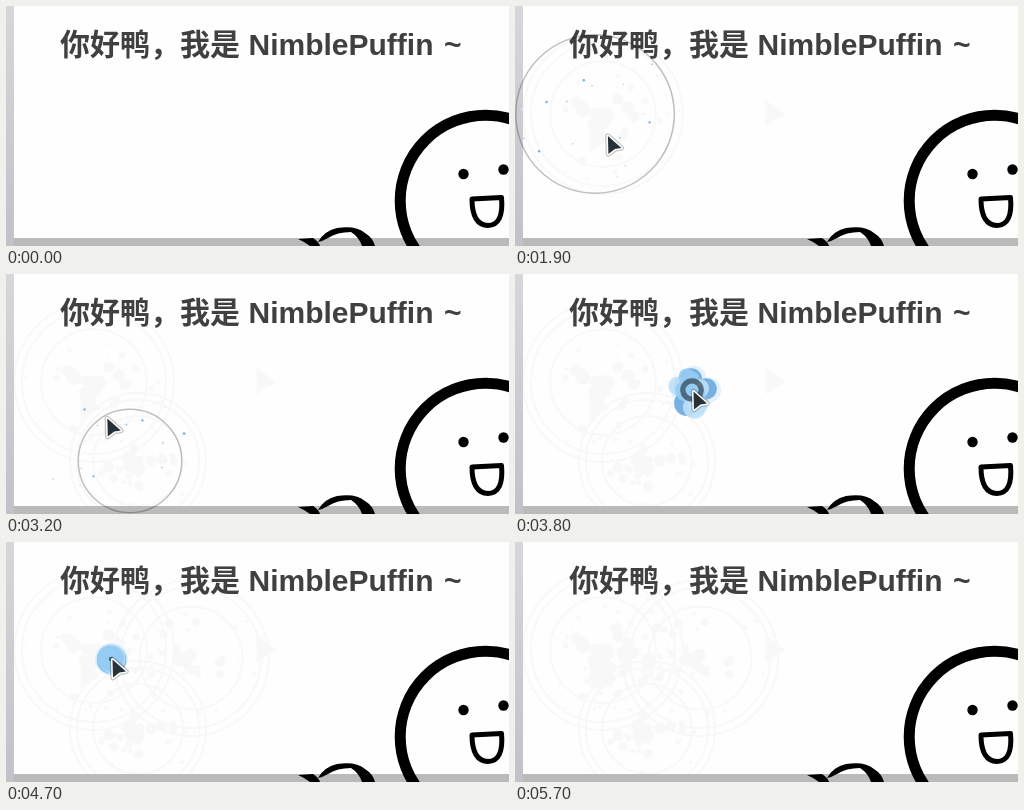
These frames come from a looping animation (503 by 240 pixels, 6000 ms). An HTML page:

```html
<!DOCTYPE html>
<html lang="zh-CN">
<head>
<meta charset="utf-8">
<title>Click fireworks</title>
<style>
html, body { margin: 0; width: 100%; height: 100%; overflow: hidden; background: #fff; }
svg { display: block; width: 503px; height: 240px; }
.title { font: bold 30px "Liberation Sans", "Noto Sans CJK SC", "Noto Sans CJK", sans-serif; fill: #404040; }
</style>
</head>
<body>
<svg viewBox="0 0 503 240" xmlns="http://www.w3.org/2000/svg">
  <defs>
    <linearGradient id="side" x2="0" y2="1">
      <stop offset="0" stop-color="#d8d6da"/>
      <stop offset="1" stop-color="#c2c1c8"/>
    </linearGradient>
    <clipPath id="panel"><rect x="8" width="495" height="232"/></clipPath>
    <path id="arrow" d="M1.500 2.500L15 14.500L8.500 15.500L2 20.500Z" stroke-linejoin="round"/>
  </defs>
  <rect width="503" height="240" fill="url(#side)"/>
  <rect x="8" y="232" width="495" height="8" fill="#bababb"/>
  <rect x="8" width="495" height="232" fill="#fefefe"/>
  <g id="stains" clip-path="url(#panel)" fill="#f8f8f8" stroke="#f8f8f8"></g>

  <g>
    <path d="M292 233L307 232Q313 236 314 240H304Q299 236 292 233Z"/>
    <path d="M312 236Q318 225 331 222Q350 219 359 227Q367 232 369 240H356Q353 231 345 226Q331 226 322 232Q317 235 312 236Z"/>
    <circle cx="479.700" cy="194.700" r="85.500" fill="none" stroke="#000" stroke-width="11"/>
    <circle cx="457.500" cy="168" r="5.200"/>
    <circle cx="497.500" cy="163.500" r="5.200"/>
    <path d="M466 193L495.500 191.500Q498 219 482 219.500Q466 219 466 193Z" fill="#fefefe" stroke="#000" stroke-width="5" stroke-linejoin="round"/>
  </g>

  <g class="title">
    <text x="54" y="49">你好鸭，我是</text>
    <text x="242.500" y="49">NimblePuffin</text>
    <text x="438" y="49">~</text>
  </g>
  <g id="fx"></g>
  <g id="cursor">
    <use href="#arrow" fill="none" stroke="#000" stroke-width="5.500" opacity=".22"/>
    <use href="#arrow" fill="#263238" stroke="#fff" stroke-width="3"/>
    <use href="#arrow" fill="#263238"/>
  </g>
</svg>
<script>
const LOOP = 6000, STEP = 100;
const el = id => document.getElementById(id);
// Paint order: later shades lie on top
const blues = ['#e0f0fc', '#6ca9df', '#bfe0f8', '#93ccf3'];

function rng(seed) {
  return () => (seed = (seed * 16807) % 2147483647) / 2147483647;
}

const dot = (x, y, r, attrs = '') =>
  `<circle cx="${x.toFixed(2)}" cy="${y.toFixed(2)}" r="${r.toFixed(2)}" ${attrs}/>`;

// Pointer: first place, then eased moves
const home = { x: 250, y: 95 };
const moves = [
  { from: 800, to: 1200, x: 76, y: 119 },
  { from: 1200, to: 1400, x: 80, y: 107 },
  { from: 1700, to: 2300, x: 124, y: 186 },
  { from: 2800, to: 3300, x: 97, y: 137 },
  { from: 3300, to: 3600, x: 177, y: 115 },
  { from: 3900, to: 4400, x: 105, y: 115 },
  { from: 4900, to: 5300, x: 475, y: 106 }
];

function pointer(t) {
  if (t < moves[0].from || t > moves.at(-1).to) return null;
  let { x, y } = home;
  for (const m of moves) {
    const k = Math.min(1, Math.max(0, (t - m.from) / (m.to - m.from)));
    const e = k * k * (3 - 2 * k);
    x += (m.x - x) * e;
    y += (m.y - y) * e;
  }
  return [x, y];
}

// ring: radius the circle tends to; speed: pace of the burst
const bursts = [
  { x: 80, y: 108, start: 1670, speed: 2.4, ring: 104 },
  { x: 124, y: 187, start: 2650, speed: 1, ring: 68 },
  { x: 177, y: 116, start: 3752, speed: 1, ring: 78 },
  { x: 105, y: 117, start: 4696, speed: 1, ring: 78 }
];
const COUNT = 16, LIFE = 0.75;

bursts.forEach((b, n) => {
  const rnd = rng(41 + n * 97);
  b.dots = Array.from({ length: COUNT }, (_, i) => {
    const shade = Math.floor(i * blues.length / COUNT);
    return { angle: i * 2.4 + rnd(), reach: 30 + rnd() * 58, size: 18 - shade * 1.5 - rnd() * 4, shade };
  });
});

function drawBurst(b, t) {
  const age = (t - b.start) / 1000 * b.speed;
  if (age < 0 || age > LIFE) return '';
  const rest = Math.exp(-4.6 * age), left = Math.exp(-2.6 * age);
  const parts = b.dots.map(d => {
    const r = d.reach * (1 - rest);
    return dot(b.x + r * Math.cos(d.angle), b.y + r * Math.sin(d.angle), d.size * rest,
      `fill="${blues[d.shade]}" opacity=".9"`);
  });
  const radius = b.ring * (1 - left), alpha = 0.5 * (1 - age / 1.1);
  const width = Math.min(6 * left, radius + 2);
  parts.push(dot(b.x, b.y, radius, `fill="none" stroke="#000" stroke-width="${width.toFixed(2)}" opacity="${alpha.toFixed(3)}"`));
  return parts.join('');
}

// Faint marks left behind by the pointer and the bursts
const arrowMark = (x, y) => `<path d="M${x} ${y}l19 13l-10 5l-9 7z"/>`;

function burstMark(b, n) {
  const rnd = rng(11 + n * 31), cx = b.x + 8, size = Math.min(b.ring, 80);
  let out = '';
  if (n < 3) {
    for (const k of [1, 0.9, 0.66]) out += dot(cx, b.y, size * k, 'fill="none" stroke-width="2"');
  }
  for (let i = 0; i < 44; i++) {
    const a = rnd() * Math.PI * 2, d = size * rnd();
    out += dot(cx + d * Math.cos(a), b.y + d * Math.sin(a), (1 - d / size) * 9 * rnd() + 0.8, 'stroke="none"');
  }
  return out;
}

const stains = [
  { at: 900, art: arrowMark(251, 95) },
  { at: 1300, art: arrowMark(75, 121) },
  ...bursts.map((b, n) => ({ at: b.start + 200, art: burstMark(b, n) }))
];
el('stains').innerHTML = stains.map(s => `<g>${s.art}</g>`).join('');
const stainNodes = [...el('stains').children];

const show = (node, on) => node.setAttribute('display', on ? 'inline' : 'none');

function render(t) {
  el('fx').innerHTML = bursts.map(b => drawBurst(b, t)).join('');
  stainNodes.forEach((node, i) => show(node, t >= stains[i].at));
  const p = pointer(t), cursor = el('cursor');
  show(cursor, p);
  if (p) cursor.setAttribute('transform', `translate(${p[0].toFixed(1)} ${p[1].toFixed(1)})`);
}

const origin = performance.now();
let last = -1;
function tick() {
  const t = Math.floor(((performance.now() - origin) % LOOP) / STEP) * STEP;
  if (t !== last) render(last = t);
  requestAnimationFrame(tick);
}
tick();
</script>
</body>
</html>
```
